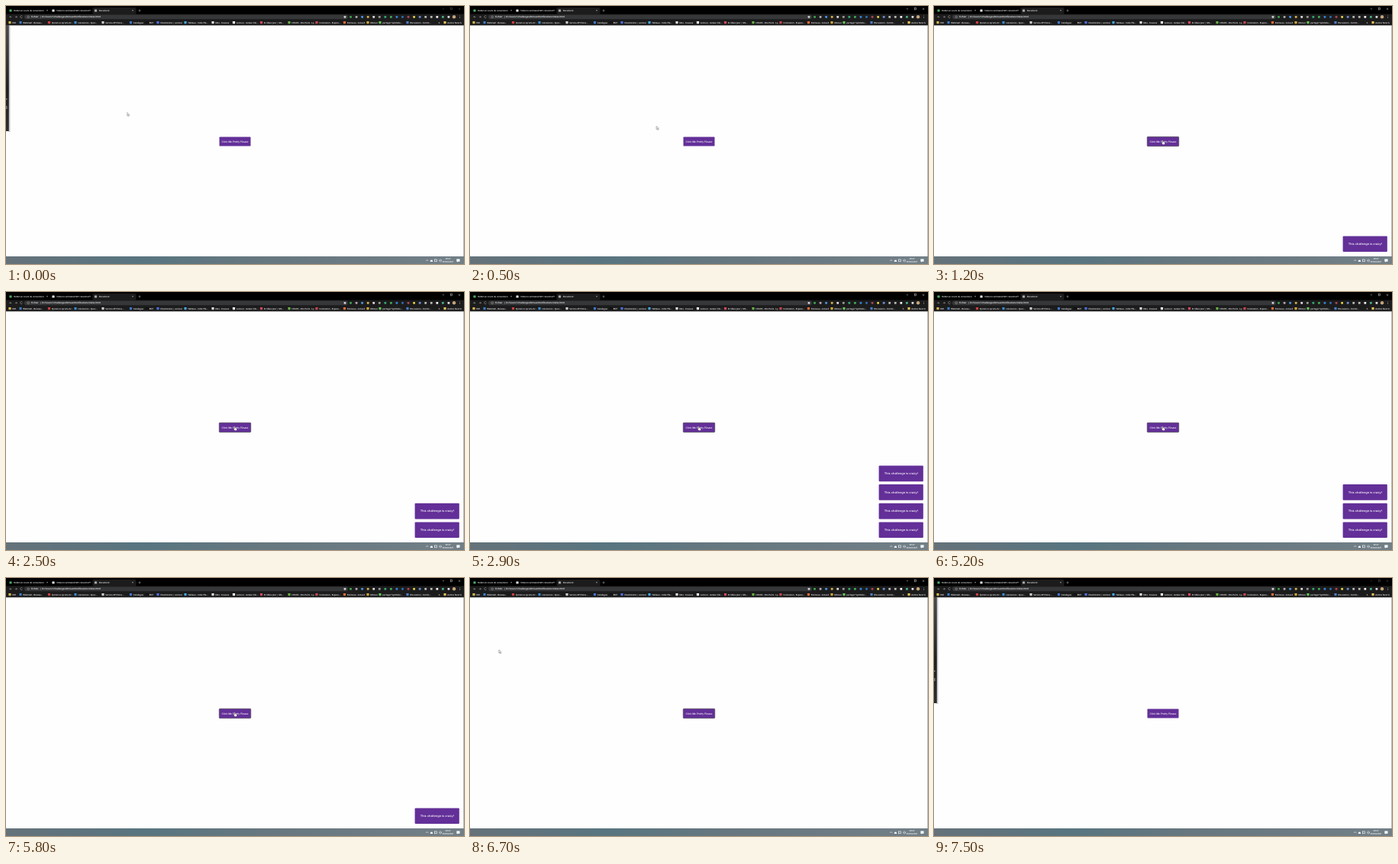
These frames come from a looping animation (600x338 px, 7.6 s). An HTML page:

```html
<!DOCTYPE html>
<html lang="fr">
<head>
<meta charset="utf-8">
<title>Toast notifications</title>
<style>
  html, body { margin: 0; width: 100%; height: 100%; overflow: hidden; background: #fefefe; }
  svg { display: block; width: 100vw; height: 100vh; }
  text { font-family: "Open Sans", "Noto Sans", sans-serif; text-rendering: geometricPrecision; }
  .ui { fill: #fff; font-weight: 600; }
  .app { font-family: Inter, sans-serif; font-weight: 500; fill: #fff; text-anchor: middle; }
  .purple { fill: #632f98; }

  .timed { animation: 7.6s step-end infinite; }
  #toast0 { animation-name: toast0; }
  #toast1 { animation-name: toast1; }
  #toast2 { animation-name: toast2; }
  #toast3 { animation-name: toast3; }
  #toast4 { animation-name: toast4; }
  #panel { animation-name: panel; }
  #focus { animation-name: focus; }
  #hand { animation-name: hand; }
  #controls { animation-name: controls; }
  #arrow { animation: arrow 7.6s linear infinite; }

  /* Each stack slot is filled on a click and freed three seconds after the oldest one. */
  @keyframes toast0 { 0%, 78.8% { visibility: hidden } 15.7% { visibility: visible } }
  @keyframes toast1 { 0%, 76.2% { visibility: hidden } 28.8% { visibility: visible } }
  @keyframes toast2 { 0%, 73.6% { visibility: hidden } 34.1% { visibility: visible } }
  @keyframes toast3 { 0%, 68.3% { visibility: hidden } 36.7% { visibility: visible } }
  @keyframes toast4 { 0%, 55.1% { visibility: hidden } 39.4% { visibility: visible } }
  @keyframes panel { 0%, 96% { visibility: visible } 2.6% { visibility: hidden } }
  @keyframes focus { 0%, 96% { visibility: hidden } 15.7% { visibility: visible } }
  @keyframes hand { 0%, 82.8% { visibility: hidden } 12.4% { visibility: visible } }
  @keyframes controls { 0%, 96% { opacity: .4 } 2.6% { opacity: 1 } }
  @keyframes arrow {
    0%, 1.3% { transform: translate(158.5px, 139.5px); visibility: visible; animation-timing-function: ease-in-out }
    10.5% { transform: translate(295px, 168px) }
    12.3% { transform: translate(299px, 175px); visibility: visible }
    12.4%, 82.7% { transform: translate(299px, 175px); visibility: hidden }
    82.8% { transform: translate(299px, 175px); visibility: visible; animation-timing-function: ease-in-out }
    89.5%, 94.6% { transform: translate(15px, 87px); visibility: visible }
    94.7%, 100% { transform: translate(0, 87px); visibility: hidden }
  }
</style>
</head>
<body>
<svg viewBox="0 0 600 338" preserveAspectRatio="none">
  <defs>
    <linearGradient id="bar">
      <stop offset="0" stop-color="#65727a"/>
      <stop offset=".3" stop-color="#587580"/>
      <stop offset=".55" stop-color="#66777f"/>
      <stop offset="1" stop-color="#727f87"/>
    </linearGradient>
    <linearGradient id="edge">
      <stop offset="0" stop-color="#000" stop-opacity=".3"/>
      <stop offset="1" stop-color="#000" stop-opacity="0"/>
    </linearGradient>
    <linearGradient id="side" x2="0" y2="1">
      <stop offset="0" stop-color="#4a4a4a"/>
      <stop offset=".35" stop-color="#333"/>
      <stop offset=".6" stop-color="#1f1f1f"/>
      <stop offset="1" stop-color="#2c2c2c"/>
    </linearGradient>
  </defs>

  <rect width="600" height="338" fill="#fefefe"/>
  <rect x="599.3" y="25.4" width=".7" height="303" fill="#999"/>

  <g id="browser">
    <rect width="600" height="11" fill="#000"/>
    <rect y="10.5" width="600" height="14.9" fill="#1c1c1d"/>
    <rect x="113.5" y="2" width="57" height="9" rx="1.5" fill="#1c1c1d"/>
    <rect x="24" y="11.4" width="424" height="5.8" rx="2.9" fill="#363739"/>
  </g>
  <g id="controls" class="timed" fill="none" stroke="#eee" stroke-width=".45">
    <path d="M571.7 3.8h2.4M592.9 2.7l2.2 2.2m0-2.2l-2.2 2.2"/>
    <rect x="582.2" y="2.7" width="2.2" height="2.2"/>
  </g>
  <g fill="none" stroke="#bbb" stroke-width=".5">
    <path d="M173.5 6h3M175 4.5v3M7.5 14.3H4.8m1.2-1.2l-1.2 1.2 1.2 1.2M11.8 14.3h2.7m-1.2-1.2l1.2 1.2-1.2 1.2"/>
    <path d="M21.4 13.3a1.5 1.5 0 1 0 .2 1.4"/>
    <circle cx="29.2" cy="14.3" r="1.3"/>
    <path d="M594.5 12.6v.6m0 .8v.6m0 .8v.6" stroke-width=".8"/>
  </g>

  <rect y="328" width="600" height="10" fill="url(#bar)"/>
  <g fill="none" stroke="#fff" stroke-width=".6">
    <path d="M550.2 334l1.5-1.5 1.5 1.5M570.5 332.5v2m-1.5-3v4m-1.4-2.8v1.6"/>
    <rect x="561.3" y="332" width="3.2" height="2.8"/>
    <path d="M555.8 334.3h3.2M556.3 333.4h2.2" stroke-width="1.3"/>
  </g>
  <path d="M590.3 331.4h4.2v3.4h-2l-.9 1-.4-1h-.9z" fill="#fff"/>
  <g class="ui" font-size="2.75" text-anchor="middle">
    <text x="579" y="332.2">20:47</text>
    <text x="579" y="336.4">05/02/2021</text>
  </g>

  <rect class="purple" x="279.5" y="171.5" width="41" height="12" rx=".8"/>
  <rect id="focus" class="timed" x="279.3" y="171.3" width="41.4" height="12.4" rx=".8"
    fill="none" stroke="#1c1028" stroke-width=".6"/>
  <text class="app" x="300" y="178.6" font-size="3.25">Click Me Pretty Please</text>

  <g id="toasts"></g>

  <g id="panel" class="timed">
    <rect x="3.5" y="26" width="3" height="139" fill="url(#edge)"/>
    <rect y="25" width="3.8" height="139" fill="url(#side)"/>
    <path d="M0 122h1.5M0 132h1.6M0 134h1.6" stroke="#ccc" stroke-width=".9"/>
  </g>

  <g id="hand" class="timed">
    <path d="M299.2 176q.7-.5 1 .2v1.8l1.8.5q.7.3.5 1l-.4 2h-2.5l-1.5-2.4q.2-.6 1.1 0z"
      fill="#fff" stroke="#222" stroke-width=".3"/>
  </g>
  <g id="arrow">
    <path d="M0 0v4.2l1-.9.7 1.6.8-.4-.7-1.4h1.4z" fill="#fff" stroke="#333" stroke-width=".4"/>
  </g>
</svg>

<script>
  const browser = document.getElementById("browser");
  const toasts = document.getElementById("toasts");

  function add(parent, tag, attrs, label) {
    const node = document.createElementNS("http://www.w3.org/2000/svg", tag);
    for (const key in attrs) node.setAttribute(key, attrs[key]);
    if (label) node.textContent = label;
    return parent.appendChild(node);
  }
  const label = (x, y, words, size = 2.75) =>
    add(browser, "text", { class: "ui", x, y, "font-size": size }, words);
  const icon = (x, y, fill, size = 3.2) =>
    add(browser, "rect", { x: x - size / 2, y: y - size / 2, width: size, height: size, rx: .6, fill });

  const tabs = [
    [6, "#48a868", "Robot en cours de conversion"],
    [62, "#ddd", "Video to animated GIF converter"],
    [117.5, "#aaa", "Document"]
  ];
  tabs.forEach(([x, color, title], i) => {
    icon(x, 6, color);
    label(x + 4.2, 7, title);
    label([53, 109, 165][i], 7, "×", 3.6);
  });

  label(33, 15.3, "Fichier", 2.95);
  label(44.5, 15.3, "|", 2.95);
  label(47.3, 15.3, "D:/Cours/!-Challenges/D/toastNotifications/index.html", 2.95);

  const tints = ["#ccc", "#3da34d", "#aaa", "#4d91df", "#cfb04a", "#ddd", "#999", "#34a66f",
    "#42a85b", "#377fd1", "#2d6dab", "#a84658", "#e4cf3e", "#658fce", "#bbb", "#bbb", "#eee", "#4cae83", "#ddd"];
  tints.forEach((color, i) => icon(444 + i * 7.55, 14.3, color, 2.8));
  add(browser, "circle", { cx: 587, cy: 14.3, r: 2.2, fill: "#c8a47d" });

  const bookmarks = [
    [5, "#d6b84b", "EXE"],
    [19, "#3979c5", "Webmail - Bureau…"],
    [56.5, "#cc3f3f", "Qu'est-ce qu'une Ar…"],
    [91, "#3b8ad0", "ressources - Spac…"],
    [127, "#ccc", "Service API Docu…"],
    [163.5, "#4276c8", "Catalogue"],
    [184.5, "#111", "ENT"],
    [199, "#4b71df", "Illustrations | vecteur"],
    [235, "#45a6dc", "Tableau - Code Pla…"],
    [271, "#ddd", "Mes - travaux"],
    [298.5, "#fff", "Lecteur - Auteur blo…"],
    [334.5, "#d44b61", "AI Idées Jour | Mo…"],
    [371, "#68b244", "COURS - Site Paris - Ly…"],
    [407, "#ca474b", "Connexion - Espace…"],
    [443.5, "#df6c36", "Panneau - Accueil"],
    [474, "#cda939", "Moteur"],
    [490, "#63c35b", "partage? Symbole…"],
    [526, "#4c7cc7", "Discussion - Comm…"],
    [575, "#e1bf54", "Autres favoris"]
  ];
  bookmarks.forEach(([x, color, title]) => {
    icon(x, 21.6, color);
    label(x + 3.3, 22.6, title);
  });
  label(566.5, 22.8, "»", 3.6);

  for (let i = 0; i < 5; i++) {
    const y = 301.4 - i * 24.65;
    const toast = add(toasts, "g", { id: `toast${i}`, class: "timed" });
    add(toast, "rect", { class: "purple", x: 535.6, y, width: 58.2, height: 20.7, rx: 1 });
    add(toast, "text", { class: "app", x: 564.8, y: y + 11.7, "font-size": 3.95 }, "This challenge is crazy!");
  }
</script>
</body>
</html>
```
